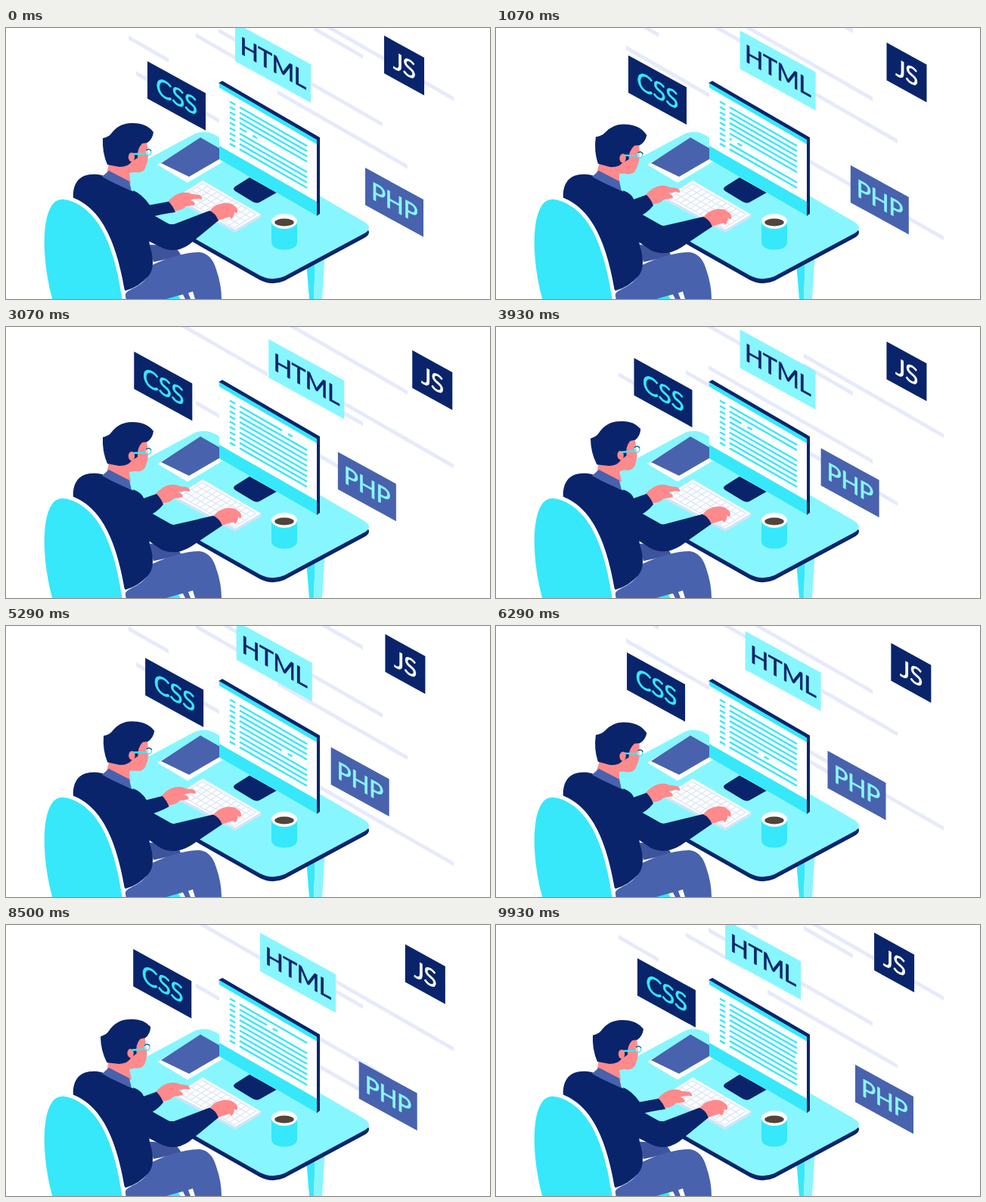
These frames come from a looping animation (640 px wide and 359 px high, 10000 ms). An HTML page:

```html
<!DOCTYPE html>
<html lang="en">
<head>
<meta charset="utf-8">
<title>Coding at a desk</title>
<style>
html, body { margin: 0; width: 100%; height: 100%; overflow: hidden; background: #fff; }
svg { display: block; width: 100vw; height: 100vh; }
text { font: 32px Lato, sans-serif; letter-spacing: -0.6px; text-anchor: middle; stroke: currentColor; stroke-width: 0.6; }
.navy { fill: #09246b; color: #09246b; }
.slate { fill: #4862ae; }
.cyan { fill: #36e8fa; color: #36e8fa; }
.light { fill: #88f6ff; color: #88f6ff; }
.skin { fill: #ff8a8c; }
.white { fill: #fff; color: #fff; }
.bar { fill: #e6eafb; }
</style>
</head>
<body>
<svg viewBox="0 0 640 359" preserveAspectRatio="none">
  <defs>
    <path id="top" d="M140 199L248 141Q262 134 277 142L474 257Q486 265 474 272L368 329Q352 336 336 328L158 227Z"/>
  </defs>
  <g id="bars"></g>

  <!-- desk -->
  <path class="cyan" d="M397 310L409 303L407 359H401Z"/>
  <path class="light" d="M409 303L422 297L418 359H407Z"/>
  <use href="#top" y="6" class="navy"/>
  <use href="#top" class="light"/>
  <path class="white" d="M200 181L256 148L292 168V174L240 205Z"/>
  <path class="slate" d="M205 179L257 145L292 165V168L242 197Z"/>
  <path class="navy" d="M303 210L322 198L358 218L335 231Q331 233 326 230L303 216Q299 213 303 210Z"/>

  <!-- monitor -->
  <path class="navy" d="M281 73L286 70L415 145V246L411 249L400 160Z"/>
  <path class="white" d="M282 74L411 149V249L282 174Z"/>
  <path class="cyan" d="M282 73L411 148V154L282 79ZM282 156L411 230V249L282 174Z"/>
  <path id="code" fill="none" stroke="#36e8fa" stroke-width="2.4"/>

  <!-- keyboard and mug -->
  <path fill="#cfe6f4" d="M224 225L260 202L337 247V251L303 271L224 229Z"/>
  <path class="white" d="M224 225L260 202L337 247L303 267Z"/>
  <path id="keys" fill="none" stroke="#dce6f5" stroke-width="1.3"/>
  <path class="cyan" d="M351 256V284C351 297 385 297 385 284V256Z"/>
  <ellipse class="white" cx="368" cy="256" rx="17" ry="10"/>
  <ellipse cx="368" cy="257.5" rx="12.7" ry="5" fill="#51443a"/>

  <!-- person -->
  <path id="handL" class="skin" d="M213 231Q222 220 233 218Q241 217 246 220L255 221Q260 223 259 227Q251 225 244 228Q250 230 250 234Q245 236 238 236Q232 243 221 242Z"/>
  <path id="armL" class="navy"/>
  <path fill="#3d549d" d="M188 287L216 288Q228 292 232 302L195 310Z"/>
  <path class="slate" d="M158 359C152 342 186 350 193 314Q230 297 256 297Q272 299 278 320Q285 340 285 359Z"/>
  <path class="cyan" d="M212 359L233 353L236 359Z"/>
  <path class="white" d="M228 355L234 353L237 359H231ZM241 351L247 349L250 359H244Z"/>
  <path class="navy" d="M89 228C87 205 98 194 114 194C126 193 134 198 140 202L165 215Q176 219 183 228L190 288Q199 316 188 329Q176 343 158 348L110 300Z"/>
  <path id="handR" class="skin" d="M268 244Q276 233 287 232Q297 231 301 235Q307 238 306 244Q304 247 302 243Q302 249 298 253Q296 249 293 251L280 255Z"/>
  <path id="armR" class="navy"/>
  <g id="head">
    <path class="skin" d="M150 160L186 150L187 159Q190 172 184 186Q180 193 170 191L163 192L165 206Q150 204 133 194L136 180Z"/>
    <path class="navy" d="M134 181Q127 165 128 146Q136 144 139 140Q150 125 168 126Q186 126 195 138Q194 147 187 152L180 153Q173 160 174 172L166 177Q162 184 150 184Z"/>
    <ellipse class="skin" cx="166" cy="171" rx="4.2" ry="6"/>
    <path d="M168 167L184 166.5" stroke="#36e8fa" stroke-width="2.4"/>
    <ellipse cx="188" cy="164.5" rx="3.8" ry="4" fill="#fff" fill-opacity=".5" stroke="#36e8fa" stroke-width="1.5"/>
    <path d="M185 162Q190 159 192 163" fill="none" stroke="#09246b"/>
  </g>
  <path class="slate" d="M127 197L136 189L163 203L166 216L140 204Z"/>

  <!-- chair -->
  <path d="M62 362C50 320 45 260 60 236Q68 222 88 230C122 244 143 285 154 362Z" fill="#36e8fa" stroke="#fff" stroke-width="10" paint-order="stroke"/>

  <g id="tags"></g>
</svg>
<script>
const LOOP = 10000, HALF = LOOP / 2, SLOPE = 0.575, TILT = 0.55;
const $ = id => document.getElementById(id);

function add(parent, name, attrs, text) {
  const el = document.createElementNS('http://www.w3.org/2000/svg', name);
  for (const k in attrs) el.setAttribute(k, attrs[k]);
  if (text) el.textContent = text;
  return parent.appendChild(el);
}

// Eased 0 to 1 between times a and b
function ease(t, a, b) {
  const u = Math.min(1, Math.max(0, (t - a) / (b - a)));
  return (1 - Math.cos(Math.PI * u)) / 2;
}
// Rises between a and b, falls between c and d
const hold = (t, a, b, c, d) => ease(t, a, b) - ease(t, c, d);
const swing = t => (1 - Math.cos(2 * Math.PI * t / HALF)) / 2;

// Floating language tags: dx is the length of the sway, slope its direction
const tags = [
  { text: 'CSS', x: 187, y: 44, w: 77, h: 49.5, box: 'navy', ink: 'cyan', dx: -25, slope: 0.65,
    sway: t => hold(t, 0, 2200, 2200, 4600) + hold(t, 4600, 7750, 7750, LOOP) },
  { text: 'HTML', x: 303, y: -7, w: 100, h: 51, box: 'light', ink: 'navy', dx: 50.5, slope: 0.52, sway: swing },
  { text: 'JS', x: 500, y: 10, w: 53, h: 50, box: 'navy', ink: 'white', dx: 42.5, slope: 0.56, sway: swing },
  { text: 'PHP', x: 475, y: 185, w: 77, h: 49.5, box: 'slate', ink: 'light', dx: -47.5, slope: 0.54,
    sway: t => hold(t, 0, 4550, 4550, LOOP) }
];
for (const tag of tags) {
  tag.el = add($('tags'), 'g', {});
  add(tag.el, 'rect', { width: tag.w, height: tag.h, class: tag.box });
  add(tag.el, 'text', { x: tag.w / 2, y: tag.h / 2 + 11.5, class: tag.ink }, tag.text);
}

// Background bars: left x, right x, y of the right end, time of the jump to the bottom
const bars = [
  [162, 215, 43, 3700], [172, 346, 160, HALF], [251, 330, 55, 1500], [281, 498, 128, 1400],
  [359, 531, 184, 3150], [407, 472, 38, 1200], [407, 592, 94, 230]
].map(([x1, x2, y, jump]) => {
  const top = y - (x2 - x1) * SLOPE;
  const points = `${x1},${top - 2.8} ${x2},${y - 2.8} ${x2},${y + 2.8} ${x1},${top + 2.8}`;
  return { jump, el: add($('bars'), 'polygon', { points, class: 'bar' }) };
});

// Keyboard grid
let grid = '';
for (let i = 0; i < 5; i++) grid += `M${231 + i * 7.2} ${224.5 - i * 4.6}l70 40`;
for (let i = 0; i < 12; i++) grid += `M${231 + i * 6.4} ${224.5 + i * 3.7}l29 -18.5`;
$('keys').setAttribute('d', grid);

// Lines of code; one line at a time, from top to bottom, is typed anew
const ROWS = 9, LEFT = 309, RIGHT = 398;
function dash(row, a, b) {
  const y = x => 105 + row * 6.95 + (x - LEFT) * SLOPE;
  return `M${a} ${y(a)}L${b} ${y(b)}`;
}
function codePath(t) {
  const p = (ROWS * t / HALF + 4.1) % ROWS, active = Math.floor(p);
  const end = LEFT + (RIGHT - LEFT) * (p - active);
  let d = '';
  for (let r = 0; r < ROWS; r++) {
    d += dash(r, 296, 303) + dash(r, LEFT, r === active ? end : RIGHT);
    if (r === active && end < 380) d += dash(r, end + 8, end + 14);
  }
  return d;
}

function draw(t) {
  const h = t % HALF;
  for (const g of tags) {
    const dx = g.dx * g.sway(t);
    g.el.setAttribute('transform', `matrix(1 ${TILT} 0 1 ${g.x + dx} ${g.y + Math.abs(dx) * g.slope * (g.text === 'HTML' || g.text === 'JS' ? 1 : -1)})`);
  }
  for (const b of bars) {
    const dy = h < b.jump ? -0.0316 * h : 0.047 * (HALF - h);
    b.el.setAttribute('transform', `translate(0 ${dy})`);
  }
  $('code').setAttribute('d', codePath(h));

  const nod = 5 * hold(h, 70, 700, 2210, 2500) - 4 * hold(h, 3210, 3500, 4290, 4640);
  $('head').setAttribute('transform', `rotate(${nod} 150 190)`);

  const reach = 1 - hold(h, 70, 500, 4290, 4640);
  const press = hold(h, 70, 320, 3210, 3450) + 0.75 * hold(h, 3580, 3900, 4290, 4640)
    - 0.6 * hold(h, 1200, 1550, 1550, 2100);
  const lx = 16 * reach, ly = 9 * reach, rx = 5 * press, ry = 8 * press;
  $('handL').setAttribute('transform', `translate(${lx - 16} ${ly - 9})`);
  $('armL').setAttribute('d', `M168 215Q180 220 ${182 + lx / 2} ${227 + ly / 1.2}L${199 + lx} ${221 + ly}Q${205 + lx} ${227 + ly} ${208 + lx} ${235 + ly}Q${200 + lx / 2} 246 184 252Z`);
  $('handR').setAttribute('transform', `translate(${rx} ${ry})`);
  $('armR').setAttribute('d', `M176 236L190 247Q202 260 222 ${260 + ry / 4}L${269 + rx} ${242 + ry}Q${277 + rx} ${245 + ry} ${281 + rx} ${255 + ry}L${242 + rx / 2} ${287 + ry / 2}Q223 ${300 + ry / 2} 204 ${290 + ry / 2}L184 280Z`);
}

const start = performance.now();
(function tick() {
  draw((performance.now() - start) % LOOP);
  requestAnimationFrame(tick);
})();
</script>
</body>
</html>
```
